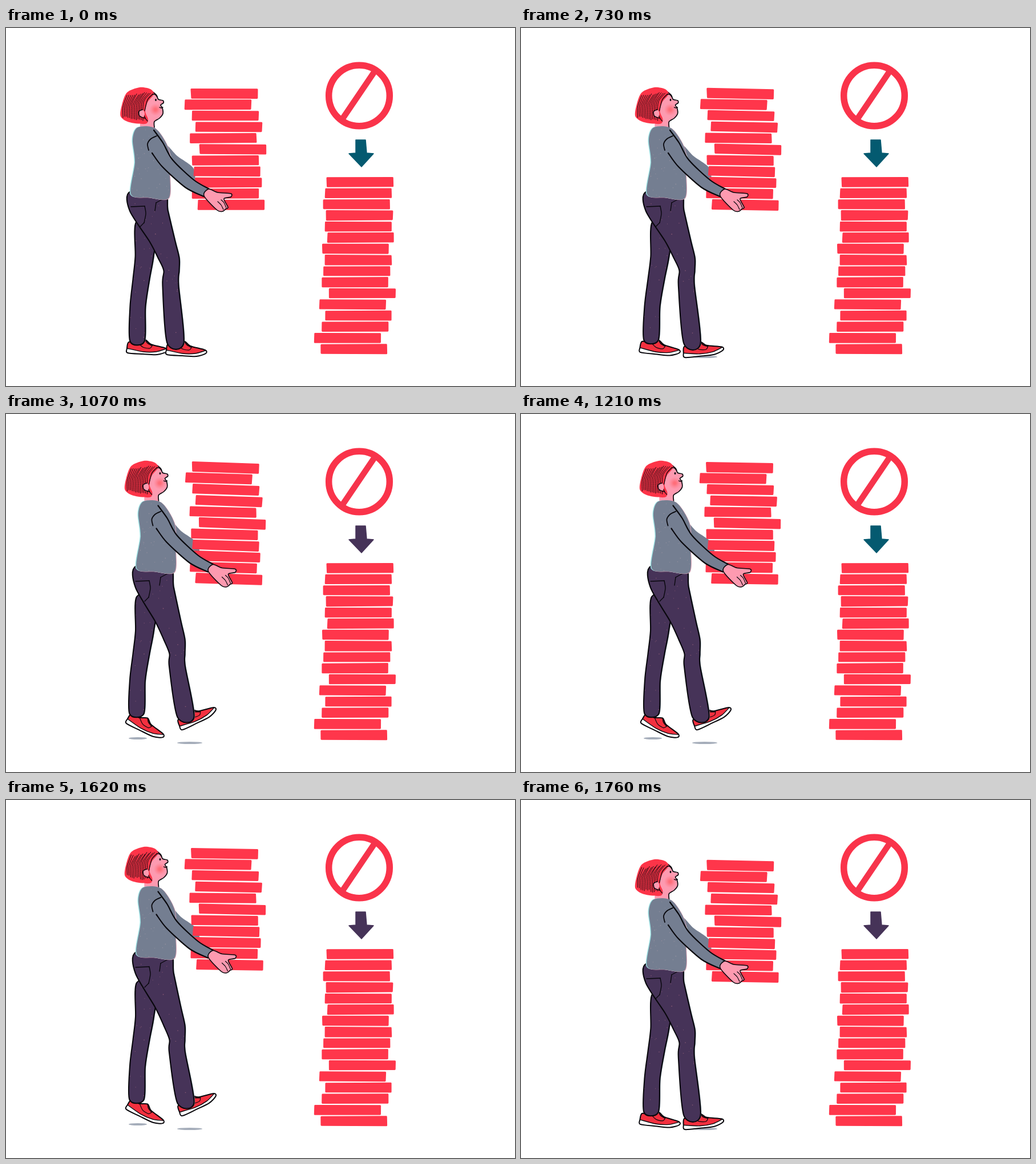
An HTML page with a canvas that plays this animation: 892x627 px, repeating every 1.83 s.

```html
<!DOCTYPE html>
<html lang="en">
<head>
<meta charset="utf-8">
<title>Carrying the stack</title>
<style>
html, body { margin: 0; width: 100%; height: 100%; overflow: hidden; background: #fff; }
canvas { display: block; }
</style>
</head>
<body>
<canvas id="stage" width="892" height="627"></canvas>
<script>
const ctx = document.getElementById('stage').getContext('2d');
const LOOP = 1830, TICK = 70;
const STEP_START = 730;
const ARROW_FLIPS = [400, 600, 1000, 1210, 1620];
const RED = '#ff364b', SKIN = '#fd9ab0', GREY = '#747e91', PLUM = '#463358', TEAL = '#045a70', INK = '#08070c';

const pts = text => text.split(' ').map(pair => pair.split(',').map(Number));
const lerp = (a, b, t) => a + (b - a) * t;

// Poses: 0 at rest, 1 heel down, 2 stepping.
const pick = (keys, p) => p < 1 ? lerp(keys[0], keys[1], p) : lerp(keys[1], keys[2], p - 1);
const pickPoint = (points, p) => [0, 1].map(axis => pick(points.map(pt => pt[axis]), p));

// Joints per pose; sections are [place: 0 hip, 1 knee, 2 ankle; width; sideways bow].
const FRONT_LEG = {
  joints: [pts('247,287 249,287 257,267'), pts('290,425 291,425 300,420'), pts('297,552 300,553 315,531')],
  sections: [[0, 60, 0], [.24, 67, -7], [.63, 45, 0], [.84, 37, 2], [1, 27, 0], [1.2, 28, -3], [2, 29, 0]]
};
const BACK_LEG = {
  joints: [pts('246,340 248,340 247,320'), pts('237,440 237,440 237,420'), pts('230,549 228,547 229,525')],
  sections: [[0, 36, 0], [.6, 32, 2], [1, 29, 0], [1.45, 27, -3], [2, 25, 0]]
};

const PROFILE = pts('257,112 264,118 267,125 275,127 276,131 271,135 274,140 275,150 269,158 260,164 260,174');
const FACE = PROFILE.concat(pts('262,178 236,178 240,130'));
const HAIR = pts('253,107 234,104 212,113 203,135 201,155 216,165 244,168 249,160 244,146 248,130 259,116');
const TORSO = pts('231,174 222,195 226,235 219,291 250,297 285,298 287,255 285,212 262,176');
const ARM_TOP = pts('259,179 275,201 292,231 329,266 356,282');
const ARM_LOW = pts('346,295 314,279 274,243 256,219');
const HAND = pts('355,282 371,288 394,290 394,296 382,299 389,314 385,317 380,321 370,319 347,294');
const SHOE = pts('0,0 15,1 29,-4 39,4 65,11 66,17 50,22 25,21 -2,19 -3,11');
const SHOE_SEAM = pts('-3,11 25,17 48,17 65,12');
const SOLE = SHOE_SEAM.concat(SHOE.slice(5, 9));

function random(seed) {
  return () => {
    seed = (seed * 16807) % 2147483647;
    return seed / 2147483647;
  };
}

function trace(points, closed) {
  const n = points.length;
  const get = i => closed ? points[(i + n) % n] : points[Math.max(0, Math.min(n - 1, i))];
  ctx.beginPath();
  ctx.moveTo(...points[0]);
  for (let i = 0; i < (closed ? n : n - 1); i++) {
    const [a, b, c, d] = [get(i - 1), get(i), get(i + 1), get(i + 2)];
    ctx.bezierCurveTo(b[0] + (c[0] - a[0]) / 7, b[1] + (c[1] - a[1]) / 7,
      c[0] - (d[0] - b[0]) / 7, c[1] - (d[1] - b[1]) / 7, c[0], c[1]);
  }
  if (closed) ctx.closePath();
}

function fill(points, color) {
  trace(points, true);
  ctx.fillStyle = color;
  ctx.fill();
}

function line(points, width = 2, closed = false, color = INK) {
  trace(points, closed);
  ctx.strokeStyle = color;
  ctx.lineWidth = width;
  ctx.stroke();
}

// Straight-edged shape with slightly rounded corners.
function block(points, color, rounding) {
  ctx.beginPath();
  points.forEach(p => ctx.lineTo(...p));
  ctx.closePath();
  ctx.fillStyle = ctx.strokeStyle = color;
  ctx.lineWidth = rounding;
  ctx.fill();
  ctx.stroke();
}

function ellipse(x, y, rx, ry, color) {
  ctx.beginPath();
  ctx.ellipse(x, y, rx, ry, 0, 0, Math.PI * 2);
  ctx.fillStyle = color;
  ctx.fill();
}

function moved([x, y], draw, angle = 0) {
  ctx.save();
  ctx.translate(x, y);
  ctx.rotate(angle);
  draw();
  ctx.restore();
}

function speckle(points, seed, count, color) {
  const rnd = random(seed);
  const [xs, ys] = [0, 1].map(axis => points.map(p => p[axis]));
  ctx.save();
  trace(points, true);
  ctx.clip();
  ctx.fillStyle = color;
  for (let i = 0; i < count; i++) {
    const x = lerp(Math.min(...xs), Math.max(...xs), rnd());
    const y = lerp(Math.min(...ys), Math.max(...ys), rnd());
    ctx.fillRect(x, y, .6 + rnd(), .6 + rnd());
  }
  ctx.restore();
}

function stack(x, y, shifts, seed) {
  const rnd = random(seed);
  const jitter = () => rnd() - .5;
  shifts.forEach((shift, i) => {
    const left = x + shift + 1.5, top = y + i * 19.5 + 1.5;
    const corners = [[0, 0], [114, 0], [114, 14.5], [0, 14.5]];
    block(corners.map(([dx, dy]) => [left + dx + jitter(), top + dy + jitter()]), RED, 3);
  });
}

function sign() {
  ctx.strokeStyle = '#fa334a';
  ctx.lineWidth = 11.5;
  ctx.beginPath();
  ctx.arc(619, 118.5, 53.3, 0, Math.PI * 2);
  ctx.stroke();
  line(pts('589,160 646,76'), 10.5, false, '#f6344c');
}

function shoe(position, angle) {
  moved(position, () => {
    fill(SHOE, '#f3303f');
    fill(SOLE, '#fff');
    line(SHOE_SEAM, 1.4);
    line(pts('16,1 25,9 37,11 42,5'), 1.2);
    line(pts('29,-4 33,2 40,6'), 1.6);
    line(SHOE, 2, true);
  }, angle);
}

function leg({ joints, sections }, p, seed) {
  const bones = joints.map(joint => pickPoint(joint, p));
  const edge = side => sections.map(([at, width, bow]) => {
    const i = at < 1 ? 0 : 1;
    const [x, y] = [0, 1].map(axis => lerp(bones[i][axis], bones[i + 1][axis], at - i));
    return [x + bow + side * width / 2, y];
  });
  const shape = edge(-1).concat(edge(1).reverse());
  moved([1.5, 0], () => fill(shape, '#7890a0'));
  fill(shape, PLUM);
  speckle(shape, seed, 45, '#8d5b76');
  line(shape, 2.1, true);
}

function head(seed) {
  const rnd = random(seed);
  fill(FACE, SKIN);
  const blush = ctx.createRadialGradient(262, 143, 2, 262, 143, 11);
  blush.addColorStop(0, 'rgba(255,105,115,.9)');
  blush.addColorStop(1, 'rgba(255,120,135,0)');
  ellipse(262, 143, 11, 11, blush);
  line(PROFILE, 1.7);
  fill(HAIR, '#fd3448');
  const strands = 13;
  for (let i = 0; i < strands; i++) {
    const u = i / (strands - 1);
    line([
      [lerp(212, 253, u), lerp(118, 111, u) + rnd() * 4],
      [lerp(205, 241, u), lerp(138, 130, u)],
      [lerp(205, 240, u), lerp(157, 163, u) - rnd() * 4]
    ], 1);
  }
  line(pts('257,116 248,126 243,145'), 1.3);
  line(pts('241,150 244,158 248,163'), 1.3);
  ellipse(238, 150, 5, 7, SKIN);
  line(pts('239,143 233,146 234,154 240,157 244,158'), 1.5);
  line(pts('257,116 262,117 265,121'), 1.5);
  ellipse(262.5, 126, 1.4, 2, INK);
  line(pts('269,139 272,140 275,139'), 1.4);
}

function torso() {
  moved([-1.5, 0], () => fill(TORSO, '#9ce0e2'));
  moved([1, .5], () => fill(TORSO, '#d9a3b5'));
  fill(TORSO, GREY);
  speckle(TORSO, 77, 60, '#95909f');
}

function arm() {
  fill(ARM_TOP.concat(ARM_LOW), GREY);
  line(ARM_TOP, 2.2);
  line(ARM_LOW, 2.2);
  line(pts('250,214 248,203 254,194 264,189'), 1.8);
  fill(HAND, SKIN);
  line(HAND, 1.6, true);
  line(pts('371,304 377,310 381,318'), 1.2);
  line(pts('377,301 382,306 386,315'), 1.2);
}

function pockets() {
  line(pts('219,313 243,312'), 1.4);
  line(pts('243,312 245,325 242,341'), 1.4);
  line(pts('242,341 235,348'), 1.4);
  line(pts('276,299 263,306'), 1.4);
  line(pts('263,306 261,320'), 1.4);
}

function person(p, tilt, hairSeed) {
  const armShift = pickPoint(pts('0,0 2,0 7.5,-18.5'), p);
  if (p >= 1) {
    ellipse(322, 576, 22, 2, '#a5adba');
    if (p > 1) ellipse(231, 568, 16, 2, '#a5adba');
  }
  moved(armShift, () => fill(pts('283,207 300,224 328,245 329,268 300,245'), GREY));
  moved(pickPoint(pts('386,212 386,212 385,191'), p), () =>
    stack(-60, -106, [-2, -13, 0, 6, -4, 13, 0, 3, 5, 0, 10], 41), tilt);

  shoe(pickPoint(pts('215,550 212,549 220,525'), p), pick([0, .05, .4], p));
  shoe(pickPoint(pts('284,553 286,558 301.5,535.5'), p), pick([0, -.16, -.5], p));
  leg(BACK_LEG, p, 19);
  leg(FRONT_LEG, p, 53);
  moved(pickPoint(pts('0,0 1,0 8,-20'), p), pockets);
  moved(pickPoint(pts('0,0 -.5,0 7.5,-22'), p), () => head(hairSeed));
  moved(pickPoint(pts('0,0 2,0 10,-21'), p), torso);
  moved(armShift, arm);
}

// Rises in half poses from STEP_START and falls back the same way before the loop ends.
function poseAt(t) {
  const rise = 1 + Math.floor((t - STEP_START) / TICK) / 2;
  const fall = 1 + (Math.ceil((LOOP - t) / TICK) - 1) / 2;
  return rise < 1 ? 0 : Math.min(rise, fall, 2);
}

// While the foot is up, the stack sways once, redrawn about 15 times a second.
function tiltAt(t, pose) {
  const drawing = Math.floor(t / 67.2 + .15);
  return pose <= 1 ? .017 * pose : .019 + .02 * Math.cos(Math.PI * (drawing - 14) / 7);
}

function draw(t) {
  const pose = poseAt(t);
  const dark = ARROW_FLIPS.filter(flip => flip <= t).length % 2;
  ctx.fillStyle = '#fff';
  ctx.fillRect(0, 0, 892, 627);
  ctx.lineCap = ctx.lineJoin = 'round';
  sign();
  block(pts('613,196 630,196 632,219 644,220 623,243 601,220 613,219'), dark ? PLUM : TEAL, 1.5);
  stack(556, 261, [6, 3, 0, 5, 3, 7, -2, 3, 0, -3, 10, -7, 3, -3, -16, -5], 97);
  person(pose, tiltAt(t, pose), t >= 1350 ? 15 : 8);
}

function tick() {
  draw(performance.now() % LOOP);
  requestAnimationFrame(tick);
}
tick();
</script>
</body>
</html>
```
